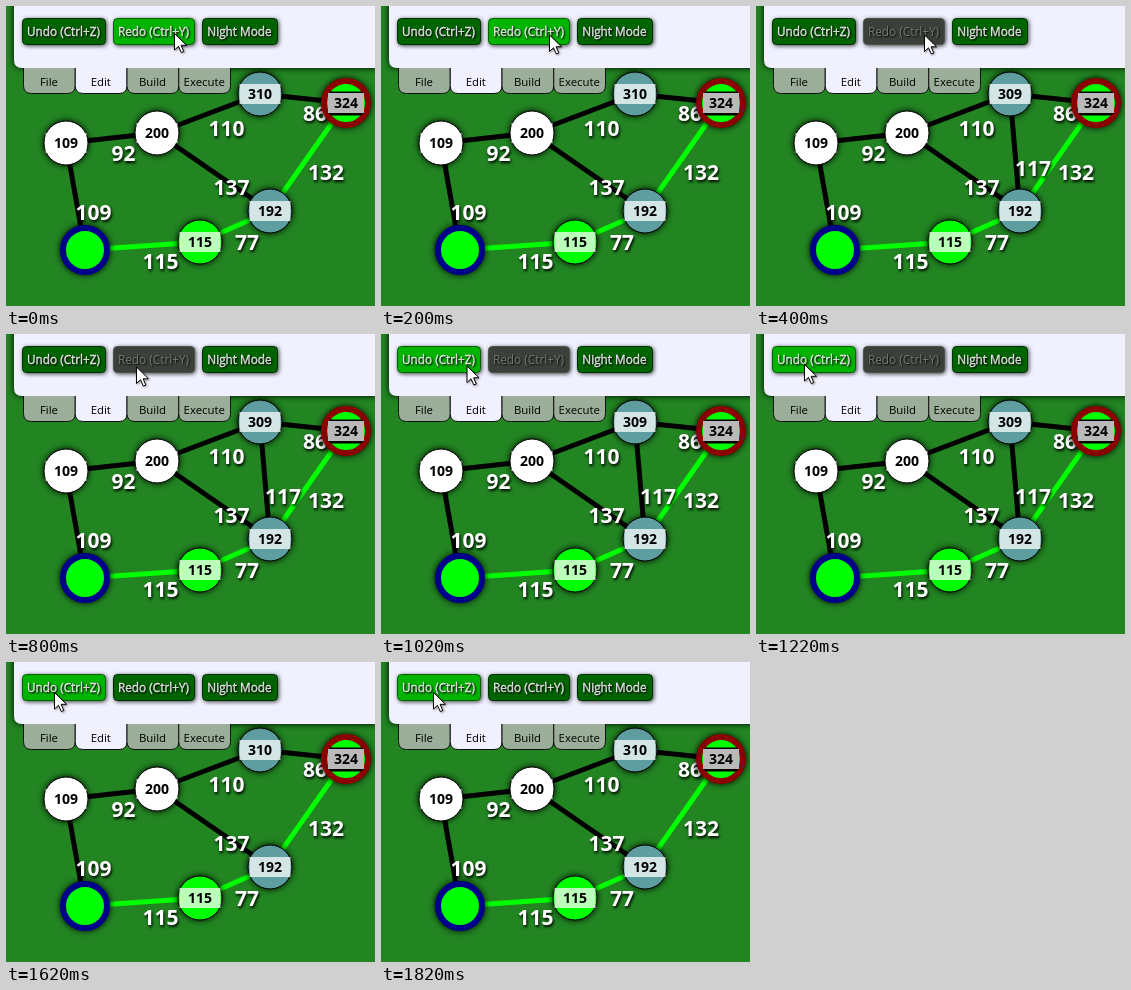
These frames come from a looping animation (369 px wide and 300 px high, 2.02 s). An HTML page:

```html
<!DOCTYPE html>
<html lang="en">
<head>
<meta charset="utf-8">
<title>Graph editor: undo and redo</title>
<style>
html, body { margin: 0; width: 100%; height: 100%; overflow: hidden; background: #228522; }
svg { display: block; font: 11.4px "Open Sans", "Noto Sans", sans-serif; text-anchor: middle; }
.panel { fill: #f0f0ff; filter: drop-shadow(0 0 3px #000); }
.tab { fill: #9aae9a; stroke: #111; }
.tab.on { fill: #f0f0ff; }
.button rect { fill: #006400; stroke: #003000; filter: drop-shadow(1px 1px 2px #000b); }
.button text { font-size: 11.8px; fill: #fff; stroke: #fff; stroke-width: .35; text-shadow: 1px 1px 2px #000; }
.hot rect { fill: #00b400; stroke: #006400; }
.off rect { fill: #3a403a; stroke: #4c524c; }
.off text { fill: #747a74; stroke: none; }
.edge { stroke: #000; stroke-width: 5; }
.route { stroke: #0f0; }
.cost { font-size: 21px; font-weight: 700; fill: #fff; text-shadow: 1px 2px 3px #000; }
.disc { filter: drop-shadow(0 0 3px #000); }
.plate { fill: #fff; fill-opacity: .73; }
.name { font-size: 14px; font-weight: 700; }
</style>
</head>
<body>
<svg id="stage" width="369" height="300" viewBox="0 0 369 300"></svg>
<script>
const stage = document.getElementById("stage");

const nodes = {
  a: { x: 60, y: 137, fill: "#fff", label: 109 },
  b: { x: 151, y: 127, fill: "#fff", label: 200 },
  c: { x: 254, y: 88, fill: "#5f9ea0", label: 310 },
  e: { x: 264, y: 205, fill: "#5f9ea0", label: 192 },
  f: { x: 194, y: 236, fill: "#0f0", label: 115 },
  start: { x: 79, y: 244, fill: "#0f0", ring: "#00008b" },
  end: { x: 340, y: 97, fill: "#0f0", ring: "#8b0000", label: 324 }
};

// from, to, cost, label centre, label baseline, on the route
const edges = [
  ["a", "b", 92, 117.5, 155],
  ["b", "c", 110, 220.5, 130],
  ["c", "end", 86, 309, 115],
  ["b", "e", 137, 225.5, 189],
  ["a", "start", 109, 87.5, 213.5],
  ["c", "e", 117, 277, 169.5],
  ["start", "f", 115, 154.5, 263],
  ["f", "e", 77, 241, 243.5],
  ["e", "end", 132, 320, 174]
].map((edge, i) => [...edge, i > 5]);

const optional = ([from, to]) => from === "c" && to === "e" ? 'data-extra=""' : "";

const line = edge => {
  const p = nodes[edge[0]], q = nodes[edge[1]];
  return `<line class="edge ${edge[5] ? "route" : ""}" ${optional(edge)}
    x1="${p.x}" y1="${p.y}" x2="${q.x}" y2="${q.y}"/>`;
};

const cost = edge =>
  `<text class="cost" ${optional(edge)} x="${edge[3]}" y="${edge[4]}">${edge[2]}</text>`;

const node = ([id, { x, y, fill, ring, label }]) => {
  const half = ring ? 18 : 20.5;
  return `<g transform="translate(${x} ${y})">
  <circle class="disc" r="22" fill="${fill}" stroke="${ring || "#000"}" stroke-width="${ring ? 6 : 1}"/>
  ${id === "end" ? '<path d="M-16-11.5H16L18-9V10L15 12.5H-15L-18 10V-9z"/>' : ""}
  ${label ? `<rect class="plate" x="${-half}" y="-10" width="${2 * half}" height="20"/>
  <text class="name" id="name-${id}" y="5.3">${label}</text>` : ""}</g>`;
};

const button = (id, x, width, label) => `<g class="button" id="${id}">
  <rect x="${x + .5}" y="12.5" width="${width - 1}" height="26" rx="4"/>
  <text x="${x + width / 2 - .5}" y="30">${label}</text></g>`;

const tab = (label, i) => {
  const x = 17.5 + i * 51.75;
  return `<path class="tab ${label === "Edit" ? "on" : ""}"
    d="M${x} 62V79.5q0 8 8 8h35.75q8 0 8-8V62"/>
    <text x="${x + 25.5}" y="79.5">${label}</text>`;
};

stage.innerHTML = `
  ${edges.map(line).join("")}
  ${edges.map(cost).join("")}
  ${Object.entries(nodes).map(node).join("")}
  <path class="panel" d="M8-10V54q0 8 8 8H380V-10z"/>
  ${["File", "Edit", "Build", "Execute"].map(tab).join("")}
  ${button("undo", 16, 84, "Undo (Ctrl+Z)")}
  ${button("redo", 107, 82, "Redo (Ctrl+Y)")}
  ${button("night", 196, 76, "Night Mode")}
  <path id="cursor" d="M0 0V16.5L4 12.8 6.8 19 9.3 18 6.6 11.8H12z"
    fill="#fff" stroke="#000" style="filter:drop-shadow(1px 1px 1px #0006)"/>`;

// Each step: start time, pointer x and y, edge present, hovered button
const steps = [
  [0, 168.5, 27.5, false, "redo"],
  [200, 168.5, 29, false, "redo"],
  [400, 168.5, 29, true, "redo"],
  [800, 130.5, 33, true, ""],
  [1020, 86, 32, true, "undo"],
  [1220, 48.5, 30.5, true, "undo"],
  [1620, 48.5, 30.5, false, "undo"],
  [1820, 52.5, 30.5, false, "undo"]
];

const find = id => document.getElementById(id);
const undo = find("undo"), redo = find("redo"), cursor = find("cursor"), nameC = find("name-c");
const extras = stage.querySelectorAll("[data-extra]");

function draw(now) {
  const time = now % 2020;
  const [, x, y, linked, hover] = steps.filter(step => step[0] <= time).pop();
  cursor.setAttribute("transform", `translate(${x} ${y})`);
  undo.classList.toggle("hot", hover === "undo");
  redo.classList.toggle("hot", hover === "redo" && !linked);
  redo.classList.toggle("off", linked);
  extras.forEach(part => part.style.display = linked ? "" : "none");
  nameC.textContent = linked ? 309 : 310;
}

const began = performance.now();
function tick() {
  draw(performance.now() - began);
  requestAnimationFrame(tick);
}
tick();
</script>
</body>
</html>
```
